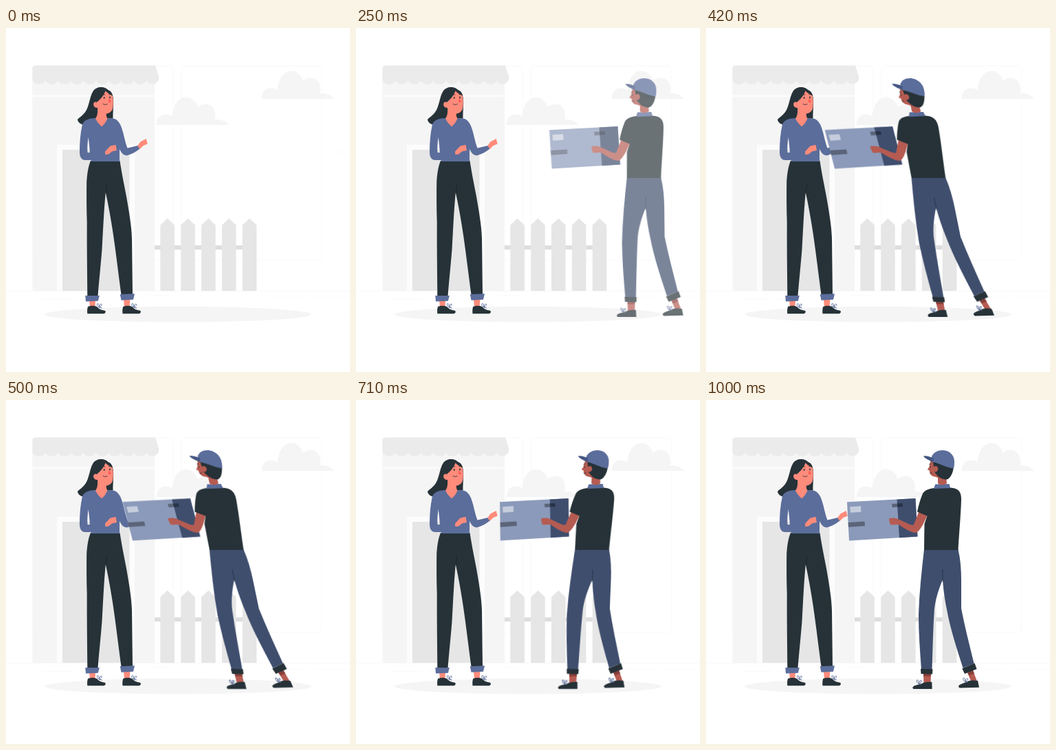
An HTML page for the animation above (1040 ms loop, 500x500 px).

```html
<!DOCTYPE html>
<html lang="en">
<head>
<meta charset="utf-8">
<title>Delivery at the door</title>
<style>
  html, body { margin: 0; width: 100%; height: 100%; overflow: hidden; background: #fff; }
  svg { display: block; width: 100vw; height: 100vh; }
  #courier { transform-origin: 250px 250px; }
  .ink { fill: #263238; }
  .blue { fill: #5b6d9b; }
  .navy { fill: #3f4e6d; }
  .peach { fill: #ff8b7b; }
  .brown { fill: #b55b52; }
  .pale { fill: #f5f5f5; }
  .grey { fill: #e6e6e6; }
  .line { fill: none; stroke: #ebebeb; stroke-width: .3; }
  .lace { fill: none; stroke: #5b6d9b; stroke-width: 1; }
  .thin { fill: none; stroke: #263238; stroke-width: .8; stroke-linecap: round; }
</style>
</head>
<body>
<svg viewBox="0 0 500 500">
  <defs>
    <path id="cloud" d="M218.5 141C219 130 225 125 232 125.5C236 125.500 239 126.500 241.500 128.500C243 112 251 100.500 261.500 100.500C270 100.500 276 107 279 115C282 111.500 286 110.500 291 110.500C299 111 304 118 304 127C304 129.500 304 131.500 303.500 133.500C311 132 319 135 323.500 141Z"/>
    <path id="picket" d="M0 382V286.500L10.300 276.800L20.600 286.500V382Z"/>
    <path id="bow" class="lace" d="M0 0C-3-1-4-5-2.500-5.500C-1-6 0-3 0 0C0-3 2-5.500 3.500-4.500C4.500-3.500 2-1 0 0L4 1"/>
    <path id="shoe" class="ink" d="M119 405C117.800 409 118 412 118.300 415.200H142.500C145 414.500 145.500 411.500 143.500 410.800C138.500 410 135 408.500 132 405C128 403 123 403.500 119 405Z"/>
  </defs>

  <g class="line">
    <rect x="38.300" y="55" width="204.300" height="282.700" rx="5.700"/>
    <rect x="254.600" y="55" width="204.300" height="282.700" rx="5.700"/>
    <path d="M0 382.500H500M52 394H96M104 394H112M208 388.300H236M384 391.300H438M446 391.300H500"/>
  </g>

  <g class="pale">
    <rect x="38.500" y="70" width="177.500" height="312"/>
    <use href="#cloud"/>
    <use href="#cloud" x="153" y="-38"/>
  </g>
  <path id="awning" fill="#ebebeb"/>
  <path fill="#fcfcfc" d="M38.500 97.300H216V100H38.500ZM74 169.500H187V382H74Z"/>
  <rect class="grey" x="82" y="177" width="97.500" height="205"/>
  <rect x="216" y="316" width="130" height="6" fill="#dedede"/>
  <g id="fence" class="grey"></g>
  <ellipse class="pale" cx="250" cy="416.200" rx="193.900" ry="11.300"/>

  <g id="customer">
    <path class="ink" d="M149 91C145 85 132 83.500 126.500 92C121 101 121 115 114.500 123C110.500 128 106 130.500 104 133C104.500 137 108 139.500 112 140.500C117 137 124 132.500 132 131.500H155.500C155 120 157.500 107 155 98C153.500 94.500 151.500 92 149 91Z"/>
    <path class="peach" d="M121 396H130L129.500 406H122ZM171 394H180.500L179.500 406H172Z"/>
    <use href="#shoe"/><use href="#shoe" x="51.200"/>
    <use href="#bow" x="135.500" y="406"/><use href="#bow" x="186" y="406"/>
    <path class="ink" d="M123 193H165.500C168 210 172 229 175 245C179 268 182.500 288 183 306L184 387.500H167.500C164 362 160 328 156 301C153 280 149 258 144.800 239C142 269 141 297 139.500 322C137.500 347 135 370 133.500 390H118.300C118 352 117.500 316 117.700 282C117 262 117 242 117.200 224C118 212 119.500 201 123 193Z"/>
    <path d="M147 226L145 240" fill="none" stroke="#172024" stroke-width=".7"/>
    <path class="blue" d="M115.300 389H135.800L133.800 396.700L116 397.500ZM165.800 387L187 386.200L185 394.800L167.500 395.700Z"/>
    <path class="blue" d="M130 131C121 131 113 134 111 140C108 153 107 167 107 180C107 188 110 192 115 192H124V194H165V176C168 182 171 185.500 176 185.200C183 183.500 188.500 180 194.500 175.500L191.500 171L176.500 174.500C173 166 171 153 168 145C165.500 137 161 132 154.500 131.200ZM119.700 159C120.800 167 121.500 174 121.800 181.300L118.500 181C118 174 118.500 166 119.700 159Z"/>
    <path class="peach" d="M144.500 91.500C142 98.500 137 103.500 132 108C129 106.500 126.500 108.500 127.200 112C128 115 130.500 116.500 133 116C133.500 122 133 128 130 131.500C132 136 135.500 140.500 139.200 143.200C143 140 146 135.500 147.500 131.500C146 129 145.500 127 145.800 124.500C151 124 155 120.500 155.500 114.500C156.200 108 156 101 154 95.500C152 92.500 148 91 144.500 91.500Z"/>
    <path class="ink" d="M144.500 91C147 95 151 95.500 155 99C154.500 94.500 152 91 148 90Z"/>
    <path class="peach" d="M144 179.500L151.500 171.500L159.500 169.800L161 178L154.500 179.300L149 183.600L144.300 184ZM191.300 171L195.500 165.300L203.700 161L205.700 168.500L199.500 171L194.500 176Z"/>
    <g class="ink"><ellipse cx="142.700" cy="101.500" rx=".9" ry="1.400"/><ellipse cx="151" cy="101" rx=".9" ry="1.400"/></g>
    <path class="thin" d="M140 97.500Q142 96 144 97M149.800 96.500L152.500 96.500M141 110.500Q143.500 112.500 147.200 110.800"/>
    <path d="M149.800 102L152.700 107.200Q151 109 149 107.800Z" fill="#ff5652"/>
  </g>

  <g id="courier">
    <path class="brown" d="M316 397H327L326.500 412H316.500ZM380 396L388 393L394 409L386 411Z"/>
    <path d="M316 397H327V401.500H316ZM380 396L388 393L390 397.500L382 400.500Z" fill="#873f3a"/>
    <path class="ink" d="M300.300 418.500C300.500 415 306 414.500 311 413C317 410 323 409 328.300 410L328.700 420H301.500ZM367 416.500C367.500 413 374 412 379 409.500C384 407 390 407.500 395 408L397 417.700L368.500 418.500Z"/>
    <use href="#bow" x="309.500" y="412.500"/><use href="#bow" x="377" y="409.500"/>
    <path class="navy" d="M317 217H366.500C370 232 371 247 371 262V303C376 329 383 356 389.500 383L373.500 389.500C364 360 355 332 350.500 307C347 290 345 276 344 261C337 278 333 292 331.800 306C330 334 329.500 363 328.500 392H313C311 365 309 338 309 312C310 280 313.500 248 317 217Z"/>
    <path d="M344 246V264" fill="none" stroke="#26324b" stroke-width=".9"/>
    <path class="ink" d="M312 390.800L329.500 391.300L329 398.500L312.500 398ZM372.300 390.200L390.500 382.500L393.500 391L376 398Z"/>

    <path fill="#8b9aba" d="M205 148.200L304.500 143L307.500 198.500L208 204.500Z"/>
    <path class="navy" d="M277.500 144.400L304.500 143L307.500 198.500L281 200.200Z"/>
    <path fill="#c5cddd" d="M209.300 155.300L225 154.300L225.500 162.700L210 163.800Z"/>
    <path opacity=".35" d="M206.600 178L230.500 176.500L231 183L207 184.700ZM270 151L285.500 150L286.200 155L270.700 156.200Z"/>

    <path class="brown" d="M309.500 162L302 181C299 183.500 291 178 280 173.500C276 171 270 171.300 266.300 172C266 175.500 267 180 269 181.500L280 181C290 188 300 193.500 305 193C312 190 317 178 322 167Z"/>
    <path class="ink" d="M331 128C324 129 318 131 315 136C311.500 144 309 153 307 162.500L321.500 168.500L317.500 180L317 218H366.500C368 192 370.500 165 371 144C371.200 135 368 128 355 127.500Z"/>
    <path class="blue" d="M331 129L333.300 122.500L353.500 122L355.300 128Z"/>
    <path class="brown" d="M327 88C325 92 325 95 324.500 97L321.800 101.300L324.800 102.500C325 108 328 111 333 111.500L337 113V121C340 124.500 347 124 350 121L349 110L344 92Z"/>
    <path class="ink" d="M330 89.500L360 97C359 106 355.500 114 350 115.500C344 115.500 339 113 336.500 110L333 106L331 97Z"/>
    <path class="brown" d="M331 97C334 94.500 338 97 337.200 101C336.500 104.500 333 105.500 331 103Z"/>
    <path class="thin" d="M324.800 93.500L327 92.500M326.300 96.300V98.300M325.800 106.500L328.500 106"/>
    <path class="blue" d="M328 82C331 76 337 73 344 73C355 73 362 82 361 91C361 94 360.800 97 360 99.300C351 99 341 92.500 329 90Z"/>
    <path fill="#455782" d="M316 81.500C320 80.500 325 82 331 84.500L329.500 90.500C325 87.500 319 86 316 81.500Z"/>
  </g>
</svg>
<script>
  const $ = id => document.getElementById(id);

  let d = 'M38.500 74V59Q38.500 54.500 43 54.500H217L222.300 71';
  for (let i = 9; i >= 0; i--) {
    const x = 38.500 + i * 18.400;
    d += `C${x + 19} 84 ${x + 1} 84 ${x} 75`;
  }
  $('awning').setAttribute('d', d + 'Z');

  $('fence').innerHTML = [0, 1, 2, 3, 4]
    .map(i => `<use href="#picket" x="${224.300 + i * 29.850}"/>`).join('');

  // Slide in from the right, with the lean settling around mid height.
  const pose = (offset, x, angle, opacity) => ({
    offset, opacity,
    transform: `matrix(1, 0, ${Math.tan(angle * Math.PI / 180)}, 1, ${x}, 0)`,
    easing: 'cubic-bezier(.36, -.01, .5, 1.38)'
  });
  const slide = $('courier').animate([
    pose(0, 250, -20, 0),
    pose(0.6, 0, 10, 1),
    pose(0.8, 0, -2, 1),
    pose(1, 0, 0, 1)
  ], { duration: 1000, fill: 'both' });
  slide.pause();

  const LOOP = 1040, STEP = 1000 / 24, LEAD = 34;
  const start = performance.now();

  function draw(now) {
    const t = Math.max(0, now - start) % LOOP;
    const step = Math.min(24, Math.floor((t + 5) / STEP));
    slide.currentTime = LEAD + (step < 2 ? 0 : step * STEP);
    requestAnimationFrame(draw);
  }
  draw(start);
</script>
</body>
</html>
```
